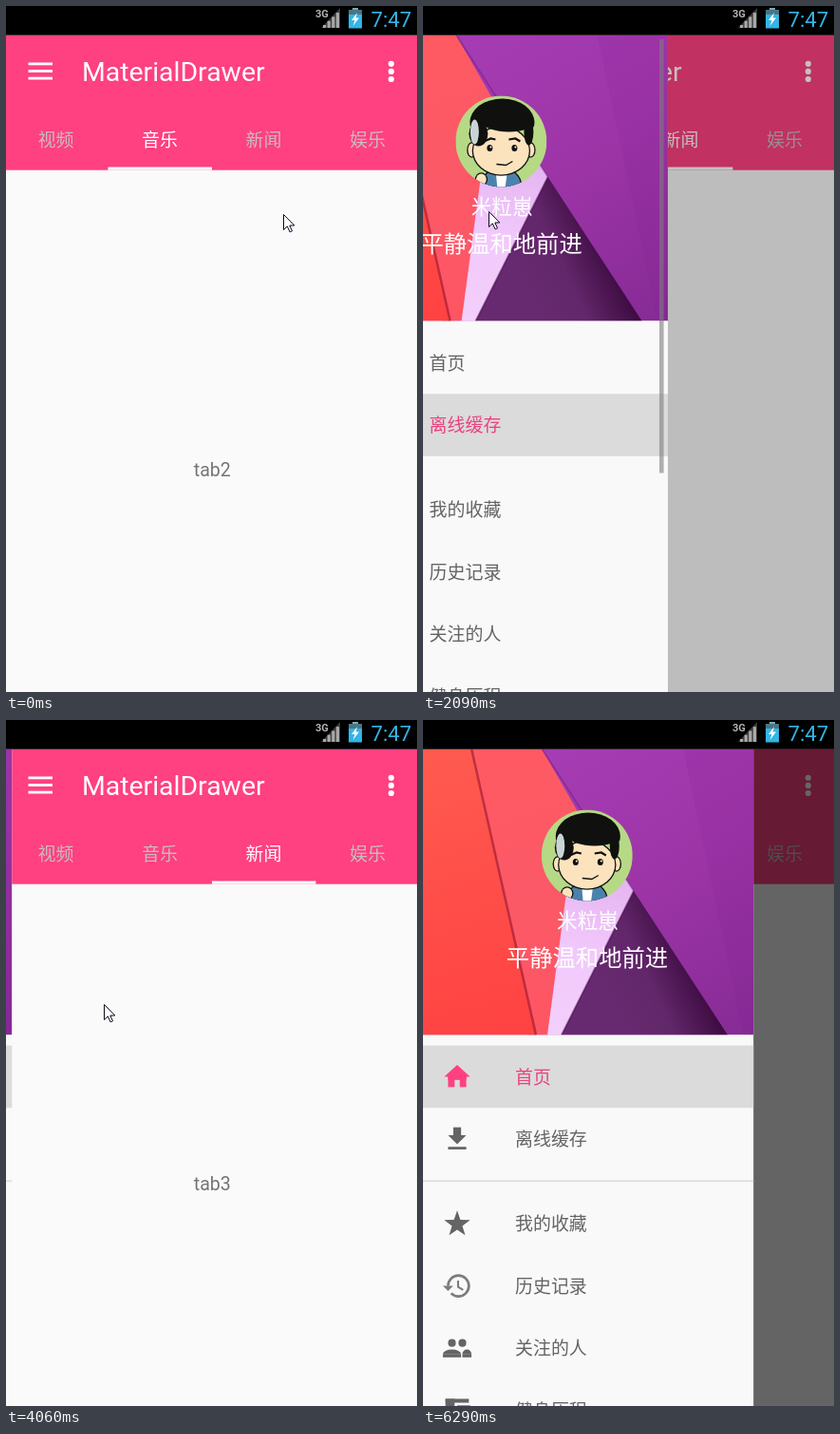
An HTML page with a canvas for the animation above (6.48 s loop, 433 by 722 pixels).

```html
<!DOCTYPE html>
<html lang="zh">
<head>
<meta charset="utf-8">
<title>MaterialDrawer</title>
<style>
html, body { margin: 0; width: 100%; height: 100%; overflow: hidden; background: #fafafa; }
canvas { display: block; width: 433px; height: 722px; }
</style>
</head>
<body>
<canvas id="stage" width="433" height="722"></canvas>
<script>
const ctx = document.getElementById('stage').getContext('2d');
const W = 433, H = 722, LOOP = 6480, STEP = 140;
const TOP = 30.6, BAR_END = 172.7, HEADER_END = 331.4;
const DRAWER = 348.4, TAB = 109.5, ROW = 65.6;
const PINK = '#ff4081', GREY = '#646464', BLUE = '#33b5e5', INK = '#10100f';
const LATIN = 'Roboto, sans-serif';
const CJK = '"Noto Sans CJK SC", "Noto Sans CJK", "Noto Sans CJK JP", sans-serif';
const SELECT_TAB = 850, SELECT_ITEM = 3740;

const clamp = x => Math.min(1, Math.max(0, x));
const mix = (a, b, p) => a + (b - a) * p;
const progress = (t, start, length) => clamp((t - start) / length);
const smooth = x => x * x * (3 - 2 * x);
const settle = (t, start) => 1 - (1 - progress(t, start, 583)) ** 5;

// The screen refreshes in bursts of nearly even steps and rests in between.
const bursts = [[150, 1150], [1300, 1700], [1970, 2900], [3020, 4060], [4210, 5180], [5300, 6290]];

function refreshTime(t) {
  const burst = bursts.filter(b => b[0] <= t).pop();
  if (!burst) return 0;
  const [first, last] = burst;
  const step = (last - first) / Math.round((last - first) / STEP);
  return Math.min(last, first + Math.floor((t - first) / step) * step);
}

// Pointer stops: time, x, y.
const stops = [
  [0, 292, 219], [579, 266, 146], [1300, 196, 211], [1700, 21, 87], [2369, 94, 285],
  [3614, 131, 386], [4903, 30, 70], [5180, 37, 70], [6290, 440, 240]
];

function pointerAt(t) {
  const i = Math.max(1, stops.findIndex(s => s[0] >= t));
  const [a, b] = [stops[i - 1], stops[i]];
  const p = smooth(progress(t, a[0], b[0] - a[0]));
  return [mix(a[1], b[1], p), mix(a[2], b[2], p)];
}

function rect(color, x, y, w, h) {
  ctx.fillStyle = color;
  ctx.fillRect(x, y, w, h);
}

function trace(pts) {
  ctx.beginPath();
  pts.forEach(([x, y]) => ctx.lineTo(x, y));
}

function poly(color, ...pts) {
  trace(pts);
  ctx.fillStyle = color;
  ctx.fill();
}

function line(color, width, ...pts) {
  trace(pts);
  ctx.strokeStyle = color;
  ctx.lineWidth = width;
  ctx.stroke();
}

function oval(color, x, y, rx, ry = rx, from = 0, to = Math.PI * 2) {
  ctx.beginPath();
  ctx.ellipse(x, y, rx, ry, 0, from, to);
  ctx.fillStyle = color;
  ctx.fill();
}

function outlined(color, x, y, rx, ry) {
  oval(INK, x, y, rx + 0.7, ry + 0.7);
  oval(color, x, y, rx - 0.6, ry - 0.6);
}

function text(str, x, y, size, color, family = CJK, align = 'left', weight = 400) {
  ctx.font = `${weight} ${size}px ${family}`;
  ctx.textAlign = align;
  ctx.fillStyle = color;
  ctx.fillText(str, x, y);
}

function fade(x0, y0, x1, y1, ...colors) {
  const g = ctx.createLinearGradient(x0, y0, x1, y1);
  colors.forEach((c, i) => g.addColorStop(i / (colors.length - 1), c));
  return g;
}

// Icons are drawn around the origin on a 24 unit grid.
const icons = {
  home(c) {
    poly(c, [-10, 0], [0, -9], [10, 0]);
    rect(c, -7, -0.5, 14, 3);
    for (const x of [-7, 2]) rect(c, x, 0, 5, 8);
  },
  download(c) {
    rect(c, -3, -9, 6, 6.2);
    poly(c, [-7, -3], [7, -3], [0, 4]);
    rect(c, -7, 6, 14, 2);
  },
  star(c) {
    poly(c, ...Array.from({ length: 10 }, (_, i) => {
      const r = i % 2 ? 4.2 : 10.5, a = i * Math.PI / 5;
      return [r * Math.sin(a), 0.5 - r * Math.cos(a)];
    }));
  },
  history(c) {
    ctx.beginPath();
    ctx.arc(1, 0, 8, Math.PI, Math.PI * 2.75);
    ctx.strokeStyle = c;
    ctx.lineWidth = 2;
    ctx.stroke();
    poly(c, [-11, 0], [-3, 0], [-7, 4]);
    line(c, 1.5, [0.7, -4], [0.7, 0.8], [4.6, 3.1]);
  },
  people(c) {
    for (const [x, body, r] of [[-4, -4, 7], [4, 7.5, 3.5]]) {
      oval(c, x, -4, 3);
      oval(c, body, 4.6, r, 3.6, Math.PI, 0);
      rect(c, body - r, 4.5, 2 * r, 2.5);
    }
  },
  wallet(c) {
    rect(c, -9, -9, 18, 3);
    rect(c, -9, -9, 7, 18);
    rect(c, 0, -4, 10, 8);
  }
};

function icon(name, x, y, color) {
  ctx.save();
  ctx.translate(x, y);
  ctx.scale(1.37, 1.37);
  icons[name](color);
  ctx.restore();
}

const tabs = ['视频', '音乐', '新闻', '娱乐'];
const menu = Object.entries({
  home: '首页', download: '离线缓存', star: '我的收藏',
  history: '历史记录', people: '关注的人', wallet: '健身历程'
});
const rowCentre = i => 375.4 + i * ROW + (i > 1 ? 23.4 : 0);

function statusBar() {
  rect('#000', 0, 0, W, TOP);
  text('3G', 326, 11.5, 11, '#b4b4b4', LATIN, 'left', 700);
  poly('#3c3c3c', [352, 2], [352, 23], [332, 23]);
  for (let i = 0; i < 4; i++) rect('#a8a8a8', 334 + i * 4.6, 20 - i * 4.3, 3.2, 3 + i * 4.3);
  rect('#7fa9b8', 365, 2, 6, 3);
  rect(BLUE, 361, 4, 14, 19.5);
  rect('#4c7482', 361, 4, 14, 5);
  poly('#fff', [370, 7], [364, 15], [367.5, 15], [365.5, 21], [372, 12.5], [368.5, 12.5]);
  text('7:47', 384.5, 21.5, 22.2, BLUE, LATIN);
}

function appScreen(t) {
  const selected = t > SELECT_TAB ? 2 : 1;
  const slide = smooth(progress(t, SELECT_TAB, 290));
  rect('#fafafa', 0, TOP, W, H);
  rect(PINK, 0, TOP, W, BAR_END - TOP);
  for (let i = 0; i < 3; i++) {
    rect('#fff', 23.5, 59.5 + i * 7.6, 25.5, 2.8);
    oval('#fff', 405.8, 60.8 + i * 8.1, 3.1);
  }
  text('MaterialDrawer', 80, 79, 28.4, '#fff', LATIN);
  tabs.forEach((name, i) =>
    text(name, 52.5 + i * TAB, 147.5, 18.94, i === selected ? '#fff' : '#c8bcc0', CJK, 'center'));
  rect('#fff', 107.4 + slide * TAB, 169.5, TAB, 3.2);
  text('tab' + (selected + 1), 217.3, 494.5, 19.6, '#757575', LATIN, 'center');
}

function avatar() {
  const x = 172.8, y = 142.5, skin = '#fbe3bd';
  ctx.save();
  ctx.beginPath();
  ctx.arc(x, y, 48, 0, Math.PI * 2);
  ctx.clip();
  rect('#b6d985', x - 48, y - 48, 96, 96);
  outlined('#4b82ad', x, y + 46, 21, 18);
  poly('#fff', [x - 6, y + 28], [x + 7, y + 28], [x + 4, y + 50], [x - 4, y + 50]);
  for (const side of [-1, 1]) outlined(skin, x + side * 31, y + 9, 4.5, 7.5);
  outlined(skin, x, y + 10, 30, 25.5);
  oval(INK, x + 1, y - 20, 34, 25, Math.PI * 0.94, Math.PI * 2.06);
  oval(INK, x + 8, y - 19, 26, 9);
  oval(INK, x - 24, y - 8, 10, 13);
  oval(INK, x + 29, y - 10, 5, 14);
  oval('#c9d5d5', x - 28, y - 10, 4.5, 13);
  for (const side of [-1, 1]) {
    const eye = x + 1 + side * 13;
    line(INK, 2.2, [eye - 6, y - 1 - side], [eye + 1, y - 3], [eye + 6, y - 1 + side]);
    oval(INK, eye, y + 7, 3, 3.6);
    oval('#fff', eye + 1, y + 6, 1);
  }
  line(INK, 1.3, [x - 5, y + 24], [x + 5, y + 25], [x + 12, y + 21]);
  outlined(skin, x - 21, y + 40, 6, 6.5);
  ctx.restore();
}

function drawerHeader() {
  const B = HEADER_END;
  ctx.save();
  ctx.beginPath();
  ctx.rect(0, TOP, DRAWER, B - TOP);
  ctx.clip();
  rect(fade(150, 30, 340, B, '#a63cb3', '#9c34a6', '#862b96'), 0, 0, DRAWER, B);
  poly('rgba(125,30,145,.14)', [274, 30], [DRAWER, 30], [DRAWER, B], [338, B]);
  poly(fade(60, 30, 150, B, '#ff5a62', '#fb5967', '#ff5563'),
    [51, 30], [125, 30], [185, 135], [131, B], [110, B]);
  poly(fade(0, 30, 80, B, '#ff5b50', '#ff4e49', '#ff4342'), [0, 30], [51, 30], [119, B], [0, B]);
  line('rgba(150,20,45,.6)', 2.5, [51, 30], [119, B]);
  poly(fade(190, 150, 140, B, '#e3b2f0', '#f1c8fb', '#f3cffb'),
    [158, 130], [190, 130], [222, 180], [146, B], [131, B]);
  poly(fade(185, 270, 270, 230, '#672a70', '#62266a', '#3e0d42'), [222, 180], [321, B], [146, B]);
  line('rgba(70,15,80,.5)', 2, [222, 180], [146, B]);
  line('rgba(90,20,110,.35)', 2, [125, 30], [222, 180]);
  avatar();
  text('米粒崽', 173.5, 219, 21.65, '#fff', CJK, 'center');
  text('平静温和地前进', 173, 259, 24.35, '#fff', CJK, 'center');
  ctx.restore();
}

function drawer(t, width, scrollbar) {
  const selected = t > SELECT_ITEM ? 0 : 1;
  const pressed = t > SELECT_ITEM - 180 && t < SELECT_ITEM;
  ctx.save();
  ctx.beginPath();
  ctx.rect(0, TOP, width, H);
  ctx.clip();
  ctx.translate(width - DRAWER, 0);
  rect('#f9f9f9', 0, TOP, DRAWER, H);
  drawerHeader();
  if (pressed) rect('#ebebeb', 0, HEADER_END, DRAWER, 161);
  rect('#dbdbdb', 0, rowCentre(selected) - ROW / 2, DRAWER, ROW);
  if (!selected) rect('#dcdcdc', 0, 484.5, DRAWER, 1.6);
  menu.forEach(([name, label], i) => {
    const soft = pressed && i === 0;
    const y = rowCentre(i);
    icon(name, 36, y, i === selected ? PINK : soft || name === 'history' ? '#7c7c7c' : GREY);
    text(label, 97, y + 7.2, 18.94, i === selected ? '#e8437f' : soft ? '#808080' : GREY);
  });
  rect(`rgba(125,125,125,${0.6 * scrollbar})`, DRAWER - 9, 35, 4.6, 456.5);
  ctx.restore();
}

function cursor([x, y]) {
  const arrow = [[0, 0], [0, 16], [3.8, 12.4], [6.6, 18.4], [9, 17.3], [6.3, 11.5], [11.3, 11.5], [0, 0]];
  ctx.save();
  ctx.translate(Math.round(x) + 0.5, Math.round(y) + 0.5);
  poly('#fff', ...arrow);
  line('#0a0a1e', 1, ...arrow);
  ctx.restore();
}

function draw(time) {
  // A small lead absorbs the unevenness of the steps.
  const t = refreshTime(time % LOOP + 16);
  const open = settle(t, 1965) - settle(t, SELECT_ITEM) + settle(t, 4871);
  const scrollbar = 1 - progress(t, t < 4200 ? 2450 : 5350, 300);
  appScreen(t);
  rect(`rgba(0,0,0,${0.6 * open ** 3})`, 0, TOP, W, H);
  if (open > 0.002) drawer(t, open * DRAWER, scrollbar);
  statusBar();
  cursor(pointerAt(t));
}

const begin = performance.now();
function loop() {
  draw(performance.now() - begin);
  requestAnimationFrame(loop);
}
loop();
</script>
</body>
</html>
```
